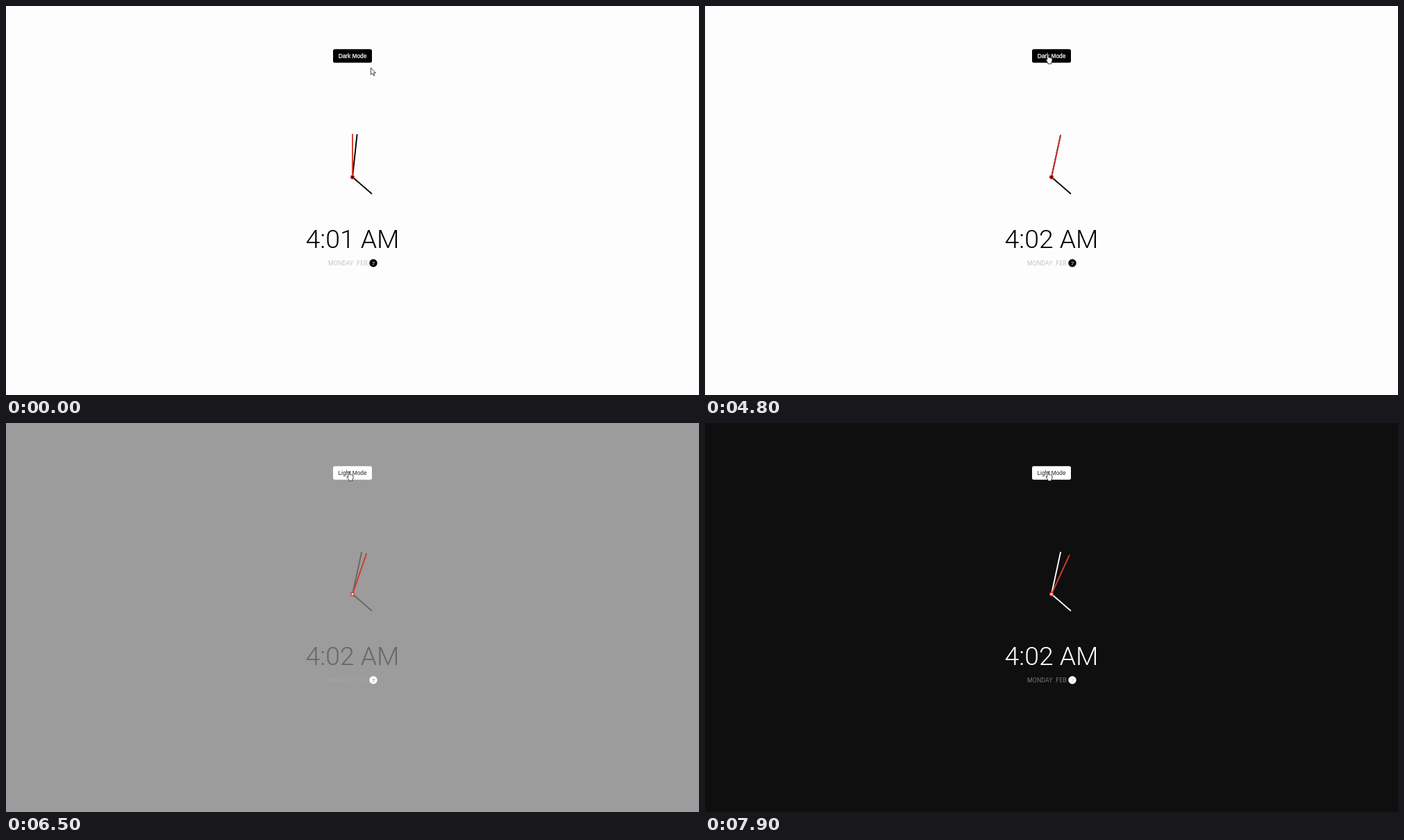
Write an HTML page that moves like this. It is 998 px wide and 561 px high and loops after 8000 ms.

```html
<!DOCTYPE html>
<html>
<head>
<meta charset="utf-8">
<title>Clock with theme toggle</title>
<style>
  html, body { margin: 0; width: 100%; height: 100%; overflow: hidden; background: #fdfdfd; }
  svg { display: block; width: 998px; height: 561px; }
  text { text-anchor: middle; font-family: Roboto, sans-serif; font-weight: 300; }
  #label { font: 8.3px "Liberation Sans", Arial, sans-serif; }
  #time { font-size: 37.4px; }
  #date { font-size: 8.73px; letter-spacing: .19px; fill: #aaa; }
  #day { font-size: 7.5px; font-weight: 400; }
  line { stroke-width: 1.9; }
  .red { stroke: #d5372d; }
  #arrow, #hand { fill: #fff; stroke: #111; stroke-width: .8; stroke-linejoin: round; }
</style>
</head>
<body>
<svg viewBox="0 0 998 561">
  <rect id="bg" width="998" height="561"/>
  <rect class="primary" x="471" y="62.3" width="56" height="19.4" rx="2.5"/>
  <text id="label" x="499" y="75"></text>
  <g transform="translate(499 246.8)">
    <line id="hour" class="needle" y2="-37" transform="rotate(130.9)"/>
    <line id="minute" class="needle" y2="-62.3"/>
    <line id="second" class="red" y2="-62.3"/>
    <circle r="3.1" fill="#d5372d"/>
    <circle class="primary" r="1.6"/>
  </g>
  <text id="time" x="499" y="348.6"></text>
  <text id="date" x="492.6" y="373.6">MONDAY .FEB</text>
  <circle class="primary" cx="529" cy="370.8" r="5.7"/>
  <text id="day" x="529" y="373.5">7</text>
  <path id="arrow" d="M0 0V10L2.3 8L4 11.6L5.6 10.9L4 7.4H7Z"/>
  <path id="hand" d="M-1 1Q0 -.6 1 1V4.6Q2.2 3.8 2.8 5Q4 4.3 4.6 5.5Q6 5 6.2 6.8V9.5L5 12V13.6H0V12L-2.8 8.2Q-3 6.6 -1 7.8Z"/>
</svg>
<script>
const $ = id => document.getElementById(id);
const all = (selector, name, value) =>
  document.querySelectorAll(selector).forEach(el => el.setAttribute(name, value));
const set = (id, name, value) => $(id).setAttribute(name, value);
const clamp = x => Math.min(1, Math.max(0, x));
const mix = (a, b, p) => a + (b - a) * p;
const gray = v => `rgb(${[v, v, v].map(Math.round)})`;

const STEP = 360 / 59;      // dial units run from 0 to 59
const FIRST_TICK = 296, PERIOD = 1500, DURATION = 757;
const TOGGLE = 6000, FADE_START = 6060;

// cubic-bezier(.42, 0, 1, 1)
function easeIn(x) {
  if (x <= 0 || x >= 1) return clamp(x);
  let lo = 0, hi = 1;
  for (let i = 0; i < 24; i++) {
    const s = (lo + hi) / 2;
    const bx = 1.26 * s * (1 - s) ** 2 + 3 * s * s - 2 * s ** 3;
    if (bx < x) lo = s; else hi = s;
  }
  return 3 * lo * lo - 2 * lo ** 3;
}
const progress = (t, start) => easeIn((t - start) / DURATION);

function secondAngle(t) {
  const tick = Math.floor((t - FIRST_TICK) / PERIOD);
  if (tick < 0) return 360;
  const p = progress(t, FIRST_TICK + tick * PERIOD);
  // wrapping from 59 to 0 sweeps all the way back
  return tick ? (tick - 1 + p) * STEP : mix(360, 0, p);
}

function drawCursor(t) {
  const u = clamp(t / 700), p = u * u * (3 - 2 * u);
  const x = mix(525.4, 493.8, p), y = mix(89, 69.8, p);
  const over = y < 81.7 && x < 527;
  all("#arrow, #hand", "transform", `translate(${x} ${y})`);
  set("arrow", "visibility", over ? "hidden" : "visible");
  set("hand", "visibility", over ? "visible" : "hidden");
}

function draw(t) {
  const dark = t >= TOGGLE, fade = progress(t, FADE_START);
  const ink = gray(mix(0, 255, fade));
  set("bg", "fill", gray(mix(253, 15, fade)));
  all(".primary", "fill", dark ? "#fff" : "#000");
  all(".needle", "stroke", ink);
  set("time", "fill", ink);
  set("day", "fill", dark ? gray(mix(70, 190, fade)) : "#fff");

  $("label").textContent = dark ? "Light Mode" : "Dark Mode";
  set("label", "fill", dark ? "#222" : "#fff");
  set("label", "stroke", dark ? "none" : "#fff");
  set("label", "stroke-width", .25);

  $("time").textContent = t < FIRST_TICK ? "4:01 AM" : "4:02 AM";
  set("minute", "transform", `rotate(${STEP * (1 + progress(t, FIRST_TICK))})`);
  set("second", "transform", `rotate(${secondAngle(t)})`);
  drawCursor(t);
}

const begin = performance.now();
function loop() {
  const t = (performance.now() - begin) % 8000;
  draw(Math.floor(t / 100) * 100);
  requestAnimationFrame(loop);
}
loop();
</script>
</body>
</html>
```
